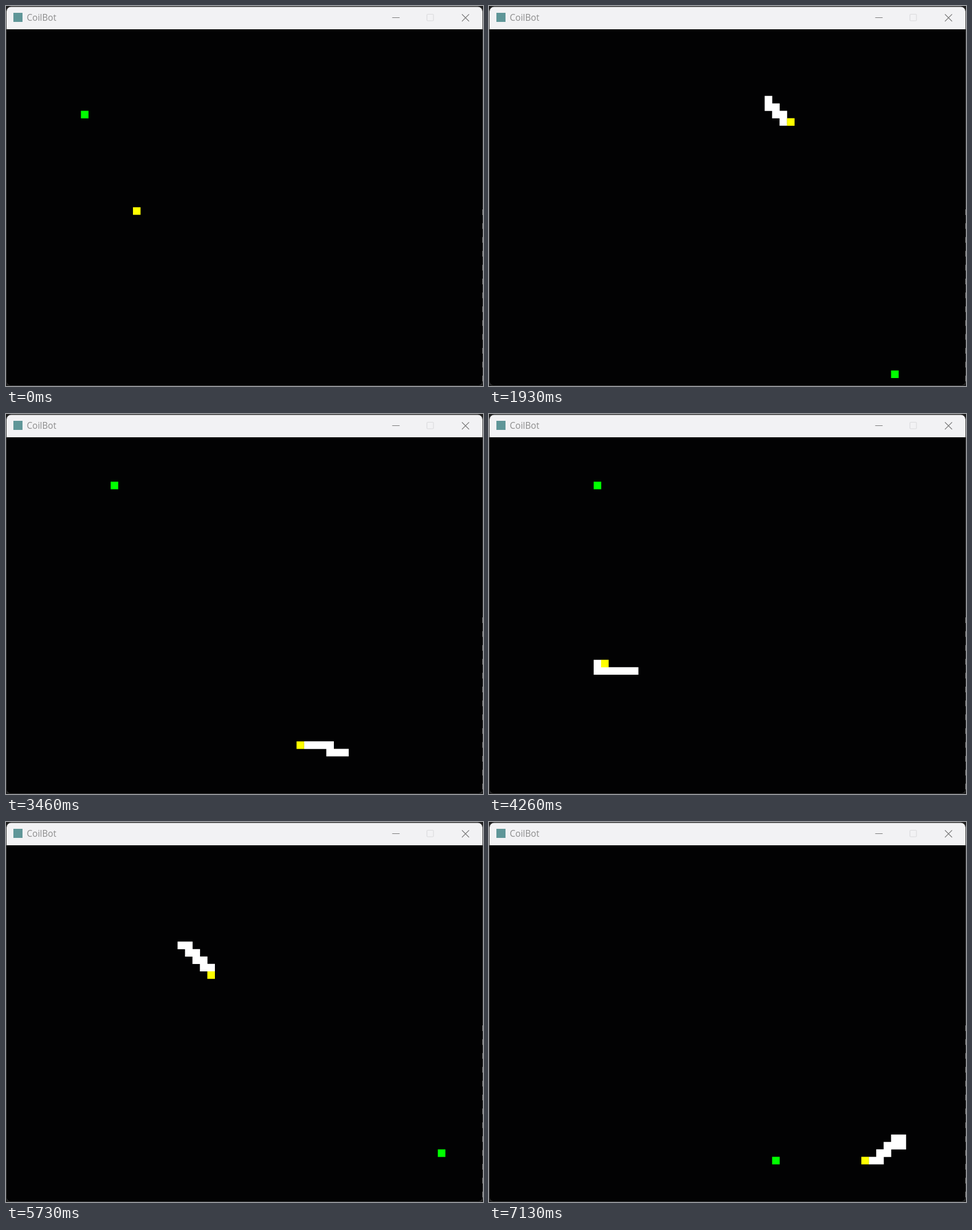
Write an HTML page that moves like this. It is 838 by 669 pixels and loops after 7200 ms.

```html
<!DOCTYPE html>
<html lang="en">
<head>
<meta charset="utf-8">
<title>CoilBot</title>
<style>
  html, body { margin: 0; width: 100%; height: 100%; overflow: hidden; background: #1c1c1c; }
  svg { display: block; width: 838px; height: 669px; }
  text { font: 15.5px "Open Sans", "Noto Sans", sans-serif; fill: #8c8c8c; }
</style>
</head>
<body>
<svg viewBox="0 0 838 669">
  <rect x="6" width="23" height="1" fill="#4a4a4a"/>
  <rect x=".5" y=".5" width="837" height="668" rx="8" fill="#020203" stroke="#3b3b3b"/>
  <path d="M1 41V9.5a8 8 0 0 1 8-8H829a8 8 0 0 1 8 8V41Z" fill="#f2f2f4"/>
  <path d="M837.5 358V669" stroke="#a8a8a8" stroke-dasharray="10 14.4"/>
  <rect x="13" y="12" width="16" height="16" fill="#5f9698"/>
  <text x="36.5" y="26">CoilBot</text>
  <g fill="none" stroke="#787878" stroke-width="1.1">
    <path d="M678.5 20.5H691.5M801 14.5L813.5 27M813.5 14.5L801 27"/>
    <rect x="739.5" y="14.5" width="11.5" height="11.5" rx="1.5" stroke="#dadadc"/>
  </g>
  <path id="food" fill="#0f0"/>
  <path id="body" fill="#fff"/>
  <path id="head" fill="#ff0"/>
</svg>
<script>
const LOOP = 7200;
const FRAMES_PER_MS = 0.015;
const CELL = 836 / 64;
const SIDE = CELL + 0.25; // slight overlap hides seams
const LEFT = 1;
const TOP = 40.8;
const DIRS = { L: [-1, 0], R: [1, 0], U: [0, -1], D: [0, 1] };

// Moves of the head: a pattern of directions and how often it repeats.
const ROUTE = `LU7 U6 L1 U2 R4 D4 L3 U1 R14
  R3 RU7 L1 U2 R3 D3 L2 DR6
  DR15 D18 R1 D1 L2 UL4 L7 U1 L4
  UL10 L14 LURU10
  L1 U6 R1 RD26
  RD10 R7 U1 L3 U1 L1 D1 LD2 L2`;

const FOODS = [[10, 11], [13, 9], [10, 13], [20, 12], [33, 5],
               [35, 6], [54, 46], [14, 6], [58, 41], [38, 42]];

// Pace: [tick, steps taken]
const PACE = [[0, 0], [16, 49], [29, 89], [52, 161], [76, 235], [95, 295], [107, 335]];

const trail = [[17, 24]];
for (const [, pattern, count] of ROUTE.matchAll(/([LRUD]+)(\d+)/g)) {
  for (const key of pattern.repeat(+count)) {
    const [x, y] = trail[trail.length - 1];
    const [dx, dy] = DIRS[key];
    trail.push([x + dx, y + dy]);
  }
}

// Step at which each food is eaten, in turn.
const meals = [];
let from = 0;
for (const [fx, fy] of FOODS) {
  const step = trail.findIndex(([x, y], i) => i >= from && x === fx && y === fy);
  if (step < 0) break;
  meals.push(step);
  from = step;
}

function stepAt(tick) {
  const i = Math.max(1, PACE.findIndex(([n]) => n >= tick));
  const [n0, s0] = PACE[i - 1];
  const [n1, s1] = PACE[i];
  return Math.round(s0 + (s1 - s0) * (tick - n0) / (n1 - n0));
}

const square = ([x, y]) =>
  `M${LEFT + x * CELL} ${TOP + y * CELL}h${SIDE}v${SIDE}h${-SIDE}z`;

const paint = (id, cells) =>
  document.getElementById(id).setAttribute("d", cells.map(square).join(""));

let shown = -1;
function draw(time) {
  const tick = Math.min(107, Math.floor((time % LOOP + 7) * FRAMES_PER_MS));
  if (tick === shown) return;
  shown = tick;
  const step = stepAt(tick);
  const eaten = meals.filter(m => m <= step).length;
  paint("food", [FOODS[eaten]]);
  paint("body", trail.slice(Math.max(0, step - eaten), step));
  paint("head", [trail[step]]);
}

const start = performance.now();
function loop() {
  draw(performance.now() - start);
  requestAnimationFrame(loop);
}
loop();
</script>
</body>
</html>
```
